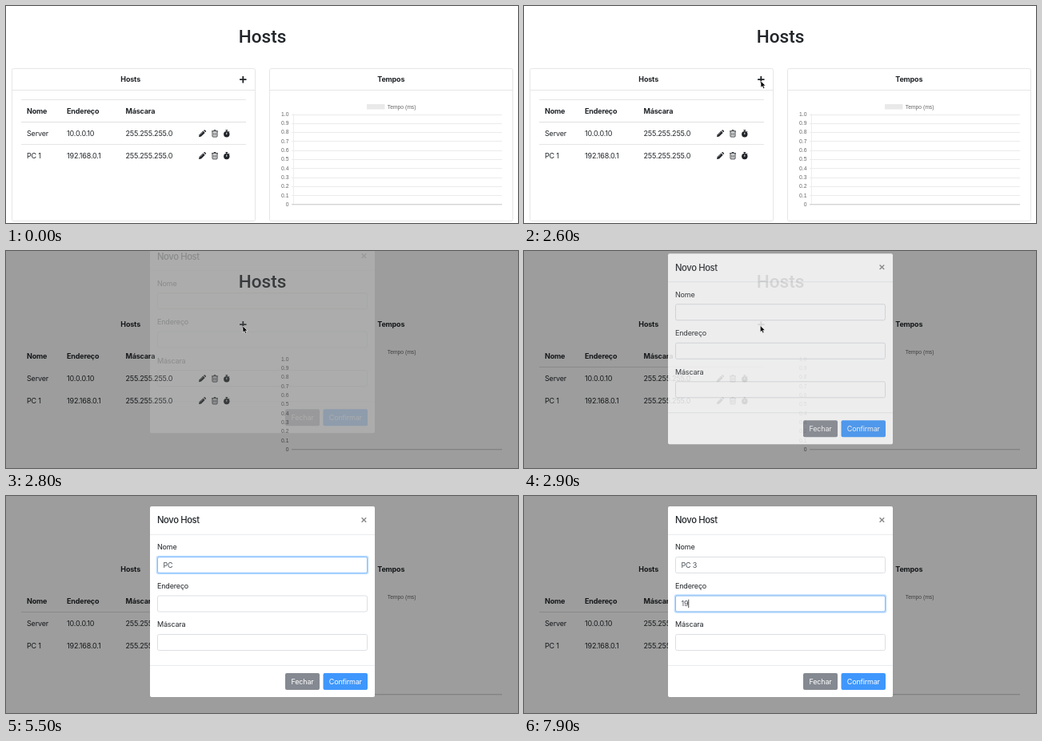
An HTML page that plays this animation: 640x272 px, repeating every 8000 ms.

```html
<!DOCTYPE html>
<html lang="pt">
<head>
<meta charset="utf-8">
<title>Hosts</title>
<style>
  html, body { margin: 0; width: 100%; height: 100%; overflow: hidden; background: #fff; }
  svg { display: block; width: 100%; height: 100%; }
  text { font: 400 9px Inter, "Noto Sans", sans-serif; letter-spacing: -.02em; fill: #212529; white-space: pre; }
  .bold { font-weight: 700; }
  .title { font: 500 22.5px Roboto, sans-serif; letter-spacing: 0; text-anchor: middle; }
  .mid { text-anchor: middle; }
  .head { font-size: 11.25px; font-weight: 500; letter-spacing: -.035em; }
  .chart { font: 400 6.75px "Liberation Sans", Arial, sans-serif; letter-spacing: 0; fill: #666; }
  .end { text-anchor: end; }
  .white { fill: #fff; }
  .value { fill: #495057; }
  .line { fill: none; stroke: #e6e6e6; }
</style>
</head>
<body>
<svg id="stage" viewBox="0 0 640 272">
  <defs>
    <g id="pencil" fill="#212529">
      <path d="M0 9l.7-3L5.4 1.4l2.3 2.3L3 8.4z"/>
      <path d="M6 .8l.7-.6q.5-.4 1 0l1.200 1.200q.4.5 0 1l-.6.7z"/>
      <path d="M1.700 6.300L5.500 2.500" stroke="#fff" stroke-width=".4"/>
    </g>
    <g id="trash" fill="none" stroke="#212529" stroke-width=".9">
      <path d="M0 1.700H8M2.500 1.500L3 .5H5l.5 1M1 2V8q0 .8.8.8H6.200Q7 8.800 7 8V2"/>
      <path d="M2.700 3.400V7.300M4 3.400V7.300M5.300 3.400V7.300" stroke-width=".6"/>
    </g>
    <g id="watch" fill="#212529">
      <circle cx="4" cy="5.500" r="3.700"/>
      <path d="M2.600 0H5.400V1H4.600V2H3.400V1H2.600zM6.300 2.200l.7-.7.7.7-.7.7z"/>
      <path d="M4 3.400V5.900" stroke="#fff" stroke-width=".9"/>
    </g>
  </defs>
  <g id="page"></g>
  <rect id="shade" width="640" height="272" opacity="0"/>
  <g id="modal" opacity="0"></g>
  <path id="arrow" d="M0 0V8.200L1.900 6.500 3.200 9.400 4.700 8.700 3.400 5.900H6z" fill="#000" stroke="#fff" stroke-width=".6"/>
  <path id="beam" d="M-2-4.500Q0-4.500 0-3.300Q0-4.500 2-4.500M0-3.500V3.500M-2 4.500Q0 4.500 0 3.300Q0 4.500 2 4.500" fill="none" stroke="#222" stroke-width=".9"/>
</svg>
<script>
const LOOP = 8000;
const $ = id => document.getElementById(id);
const clamp = v => Math.max(0, Math.min(1, v));

function add(parent, tag, attrs, content) {
  const el = document.createElementNS('http://www.w3.org/2000/svg', tag);
  for (const key in attrs) el.setAttribute(key, attrs[key]);
  if (content) el.textContent = content;
  return parent.appendChild(el);
}
const text = (parent, x, y, str, cls = '') => add(parent, 'text', { x, y, class: cls }, str);
const line = (parent, d, stroke = '#e6e6e6') => add(parent, 'path', { d, class: 'line', style: `stroke:${stroke}` });
const box = (parent, x, y, width, height, rx, fill, stroke = 'none') =>
  add(parent, 'rect', { x, y, width, height, rx, fill, stroke });

// Page
const page = $('page');
const faint = add(page, 'g', {});
for (const x of [7.5, 329.5]) {
  box(faint, x, 78.5, 304, 191, 2, '#fff', '#e6e6e6');
  line(faint, `M${x} 105.5h304`);
}
line(faint, 'M19 117.5H300M19 173.5H300');
const headRule = line(page, 'M19 145.5H300', '#e0e0e0');

text(page, 320.5, 46, 'Hosts', 'title');
text(page, 155.7, 95.3, 'Hosts', 'bold mid');
text(page, 481.3, 95.3, 'Tempos', 'bold mid');
add(page, 'path', { d: 'M296.300 88V96.400M292.100 92.200H300.500', stroke: '#212529', 'stroke-width': 1.8 });

const columns = [26, 76, 149.5];
const rows = [
  [135.2, 'Nome', 'Endereço', 'Máscara'],
  [163.2, 'Server', '10.0.0.10', '255.255.255.0'],
  [191, 'PC 1', '192.168.0.1', '255.255.255.0']
];
rows.forEach(([y, ...cells], r) => {
  cells.forEach((cell, i) => text(page, columns[i], y, cell, r ? '' : 'bold'));
  if (!r) return;
  [['pencil', 241], ['trash', 257], ['watch', 271.8]].forEach(([id, x]) =>
    add(page, 'use', { href: '#' + id, x, y: y - 8 }));
});

// Chart
const top0 = 135.5, bottom = 248.8;
for (let i = 0; i <= 10; i++) {
  const y = bottom - (bottom - top0) * i / 10;
  text(page, 353.5, y + 2.3, i ? (i / 10).toFixed(1) : '0', 'chart end');
  if (i) line(faint, `M357 ${Math.round(y) + .5}H620`, '#ebebeb');
}
line(faint, 'M359.500 135V249', '#ededed');
const baseline = line(page, 'M357 248.800H620', '#c4c4c4');
box(faint, 451, 123, 22.5, 6.5, 0, '#e9e9e9');
text(page, 476.8, 128.6, 'Tempo (ms)', 'chart');

// Dialog
const modal = $('modal');
box(modal, 180, 13, 281, 239, 2, '#fff');
line(modal, 'M180 48.500H461M180 212.500H461', '#e9ecef');
text(modal, 189, 34.4, 'Novo Host', 'head');
add(modal, 'path', { d: 'M444.600 27.200l5.600 5.600m0-5.600l-5.600 5.600', stroke: '#888', 'stroke-width': 1.4 });

const fields = [['Nome', 76], ['Endereço', 124.5], ['Máscara', 173]].map(([label, y]) => {
  text(modal, 189, y - 8.6, label);
  const glow = box(modal, 187.7, y - 1.3, 265.6, 23.6, 3, '#bfdeff');
  box(modal, 189.5, y + .5, 262, 20, 2, '#fff', '#dcdfe3');
  const edge = box(modal, 189.5, y + .5, 262, 20, 2, 'none', '#80bdff');
  return { y, glow, edge, value: text(modal, 196.5, y + 13.8, '', 'value') };
});
const caret = add(modal, 'rect', { width: .8, height: 10.5, fill: '#222' });

box(modal, 349, 222, 43, 21, 2, '#858991');
box(modal, 396.5, 222, 55.5, 21, 2, '#3f97fd');
text(modal, 370.5, 235.8, 'Fechar', 'white mid');
text(modal, 424.3, 235.8, 'Confirmar', 'white mid');

// Timeline
const path = [
  [0, 262, 285], [100, 262, 280], [900, 295, 90], [2100, 295, 90],
  [2200, 296, 94], [2850, 296, 94], [3350, 273, 80], [LOOP, 273, 80]
];
// time, field, value
const keys = [
  [3490, 0, ''], [4800, 0, 'P'], [5100, 0, 'PC'], [5700, 0, 'PC '], [5800, 0, 'PC 3'],
  [6000, 1, ''], [7700, 1, '1'], [7900, 1, '19']
];
const BLINK = 400;

function pointAt(t) {
  const i = path.findIndex(p => t < p[0]);
  const [t0, x0, y0] = path[i - 1], [t1, x1, y1] = path[i];
  const u = (t - t0) / (t1 - t0), k = u * u * (3 - 2 * u);
  return [x0 + (x1 - x0) * k, y0 + (y1 - y0) * k];
}

const show = (el, on) => el.setAttribute('visibility', on ? 'inherit' : 'hidden');

function drawFields(t) {
  const past = keys.filter(k => k[0] <= t);
  const focus = [clamp((t - 3500) / 150) * (1 - clamp((t - 6000) / 150)), clamp((t - 6000) / 150), 0];
  fields.forEach((f, i) => {
    const last = past.filter(k => k[1] === i).pop();
    f.value.textContent = last ? last[2] : '';
    f.glow.setAttribute('opacity', focus[i]);
    f.edge.setAttribute('opacity', focus[i]);
  });
  const now = past.pop();
  show(caret, now && (t - now[0]) % (2 * BLINK) < BLINK);
  if (!now) return;
  const f = fields[now[1]];
  caret.setAttribute('x', 196.5 + (now[2] ? f.value.getComputedTextLength() : 0));
  caret.setAttribute('y', f.y + 5.2);
}

function draw(t) {
  $('shade').setAttribute('opacity', .385 * clamp((t - 2610) / 130));
  show(faint, t < 2650);
  show(baseline, t < 2650 || t >= 2750);
  show(headRule, t < 2650 || t >= 2900);

  const slide = 1 - (1 - clamp((t - 2778) / 300)) ** 2;
  modal.setAttribute('opacity', clamp((t - 2778) / 150));
  modal.setAttribute('transform', `translate(0 ${-28 * (1 - slide)})`);
  drawFields(t);

  const move = `translate(${pointAt(t)})`;
  $('arrow').setAttribute('transform', move);
  $('beam').setAttribute('transform', move);
  show($('arrow'), t < 3150);
  show($('beam'), t >= 3150 && t < 4800);
}

const start = performance.now();
function tick() {
  draw((performance.now() - start) % LOOP);
  requestAnimationFrame(tick);
}
tick();
</script>
</body>
</html>
```
